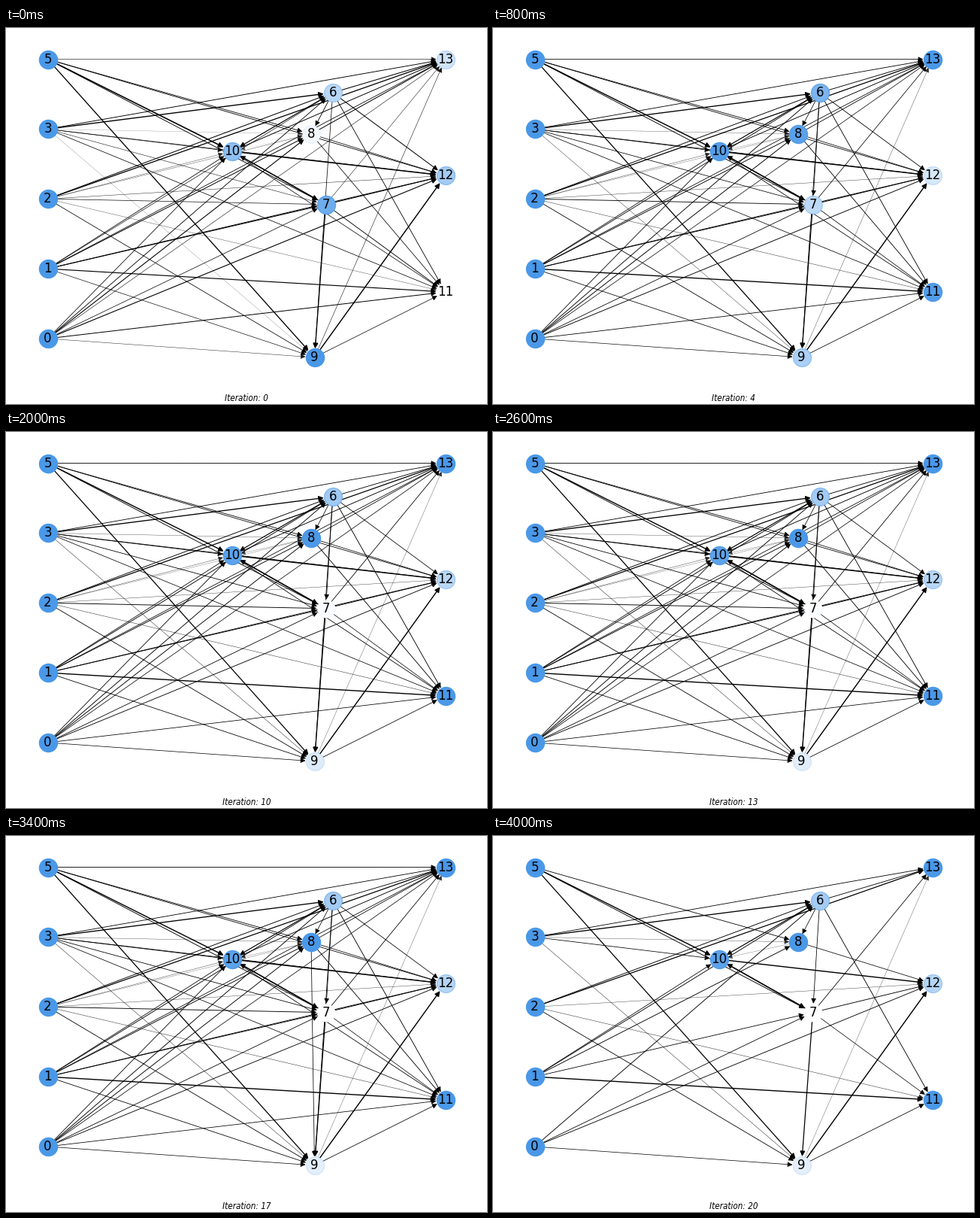
Animation, 640 px wide and 500 px high, one loop 6000 ms. Source, as a matplotlib script:

```python
import numpy as np
import matplotlib.pyplot as plt
from matplotlib.animation import FuncAnimation
from matplotlib.patches import FancyArrowPatch

W, H, DPI = 640, 500, 100
BLUE = "#4a98e8"
NODE_SIZE = 300
LAST, FRAMES, STEP = 20, 30, 200
PRUNE, DIM = 19, 14     # iterations where links are cut / briefly fade

INPUTS, OUTPUTS = (0, 1, 2, 3, 5), (11, 12, 13)
HIDDEN = {6: (434.8, 86), 7: (425.5, 234.7), 8: (406, 141), 9: (410.5, 438), 10: (300.5, 164)}
POS = {n: (55.5, 413 - 92.87 * k) for k, n in enumerate(INPUTS)}
POS.update({n: (584.5, 351 - 154.7 * k) for k, n in enumerate(OUTPUTS)})
POS.update(HIDDEN)

# Activation at the start, after two iterations and at rest
ACTIVITY = {6: (.38, 1, .5), 7: (.8, .8, 0), 8: (.07, .8, 1), 9: (1, .85, .15),
            10: (.62, 1, .9), 11: (0, .9, 1), 12: (.5, 0, .4), 13: (.26, 1, 1)}

# Hidden-to-hidden links, links cut by pruning, and links that stand out
INNER = {6: (7, 8, 9, 10), 7: (9, 10), 8: (9, 10), 10: (6, 7)}
CUT = {0: (8, 10, 11, 13), 1: (9, 12, 13), 2: (7, 8, 10), 3: (7, 11, 12), 5: (12, 13),
       6: (9, 12), 8: (9, 11, 13), 10: (11, 13)}
BOLD = {(5, 9), (5, 10), (7, 9), (7, 10), (10, 7), (10, 12), (9, 12), (3, 6), (2, 13), (1, 11)}
FAINT = {(9, 13), (2, 11), (2, 12), (2, 8), (2, 10), (3, 8), (3, 9), (8, 10)}
BORN = {(6, 7): 4, (8, 9): 15}

links = [(a, b) for a in INPUTS for b in (*HIDDEN, *OUTPUTS) if (a, b) not in {(5, 6), (5, 11)}]
links += [(a, b) for a, targets in INNER.items() for b in targets]
links += [(a, b) for a in HIDDEN for b in OUTPUTS]

rng = np.random.default_rng(4)
settled = np.array([.95 if e in BOLD else .28 if e in FAINT else .58 for e in links])
settled += rng.uniform(-.08, .08, len(links))
initial = settled + rng.uniform(-.2, .2, len(links))


def activation(node, it):
    start, peak, rest = ACTIVITY[node]
    if it < 2:
        return start + (peak - start) * it / 2
    return rest + (peak - rest) * np.exp((2 - it) / 2.5)


def alive(link, it):
    src, dst = link
    return it >= BORN.get(link, 0) and not (it >= PRUNE and dst in CUT.get(src, ()))


fig = plt.figure(figsize=(W / DPI, H / DPI), dpi=DPI, facecolor="white")
ax = fig.add_axes([0, 0, 1, 1])
ax.set(xlim=(0, W), ylim=(H, 0))
ax.axis("off")

radius = np.sqrt(NODE_SIZE) / 2
arrows = [ax.add_patch(FancyArrowPatch(POS[a], POS[b], arrowstyle="-|>", mutation_scale=10,
                                       shrinkA=radius, shrinkB=radius, color="black", zorder=1))
          for a, b in links]

nodes = {}
for n, (x, y) in POS.items():
    ax.scatter(x, y, s=NODE_SIZE, c="white", linewidths=0, zorder=2)
    nodes[n] = ax.scatter(x, y, s=NODE_SIZE, c=BLUE, edgecolors=BLUE, linewidths=1, zorder=3)
    ax.text(x, y, str(n), size=12, family="DejaVu Sans", ha="center", va="center", zorder=4)

caption = ax.text(W / 2, 496, "", size="small", family="DejaVu Sans", style="italic",
                  stretch="condensed", ha="center", va="baseline")


def update(frame):
    it = min(frame, LAST)
    widths = settled + (initial - settled) * max(0, 1 - it / 5)
    for arrow, link, w in zip(arrows, links, widths):
        arrow.set_visible(alive(link, it))
        arrow.set_linewidth(w)
        fade = .72 if it == DIM and link not in BOLD else 1
        arrow.set_alpha(min(1, .5 + w) * fade)
    for n in ACTIVITY:
        nodes[n].set_alpha(float(activation(n, it)))
    caption.set_text(f"Iteration: {it}")
    return [*arrows, *nodes.values(), caption]


anim = FuncAnimation(fig, update, frames=FRAMES, interval=STEP, repeat=True, repeat_delay=0)
plt.show()
```
